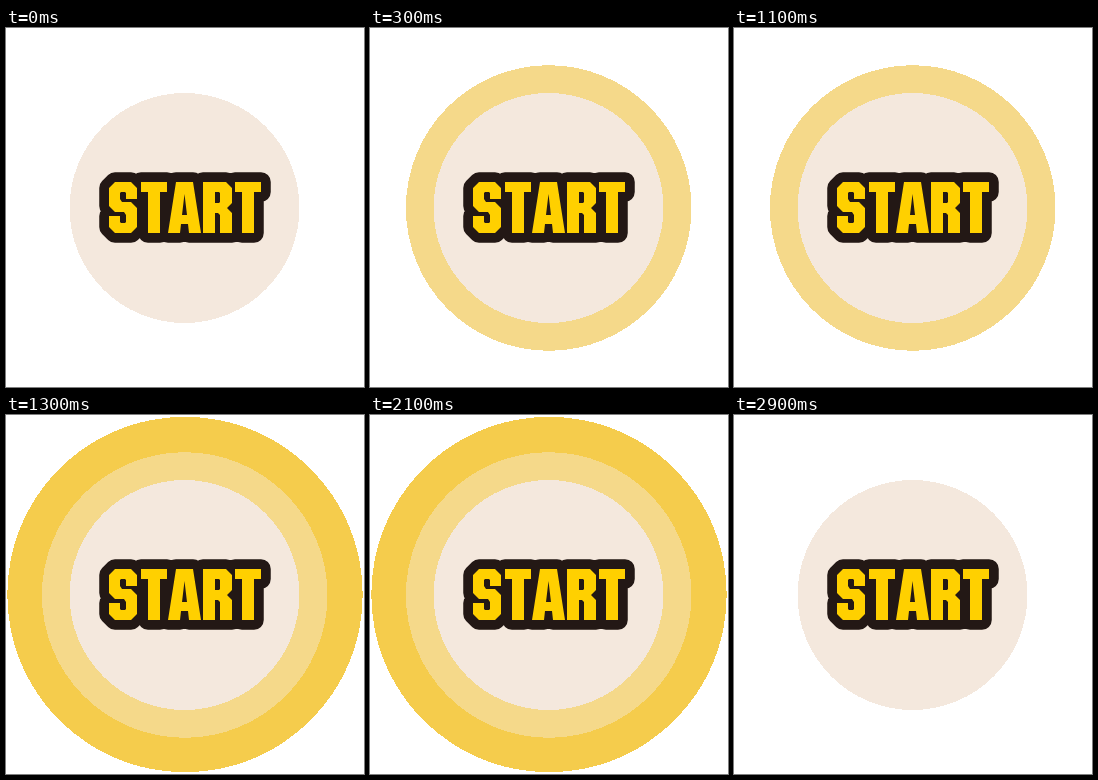
Animation of 358 by 359 pixels, one loop 3 s. Source, as an HTML page:

```html
<!DOCTYPE html>
<html lang="en">
<head>
<meta charset="utf-8">
<title>Start</title>
<style>
  html, body { margin: 0; width: 100%; height: 100%; overflow: hidden; background: #fff; }
  svg { display: block; width: 100%; height: 100%; }
  circle { shape-rendering: crispEdges; }
  .word {
    fill: #ffd000; fill-rule: evenodd;
    stroke: #231815; stroke-width: 19.5; stroke-linejoin: round; paint-order: stroke;
  }
</style>
</head>
<body>
<svg viewBox="0 0 358 359" role="img" aria-label="START">
  <circle id="outer" cx="179" cy="179.5" r="177.7" fill="#f5cc4c"/>
  <circle id="middle" cx="178.7" cy="180" r="142.8" fill="#f5d98a"/>
  <circle id="rim" cx="178.5" cy="180" r="115.5" fill="#f5d98a"/>
  <circle cx="178.5" cy="180" r="115" fill="#f4e8dd"/>
  <path class="word" d="
    M109 154H125L131 160V171H120V165L119 164H115L114 165V171L116 174H125L131 180V199L125 205H109L103 199V188H114V194L115 195H119L120 194V187L118 184H109L103 178V160Z
    M135 154H161V164H154V205H142V164H135Z
    M170 154H187L195 205H183L182 196H175L174 205H162ZM178.5 166L176 187H181Z
    M197 154H220L226 160V175L221 180L226 185V205H214V187L212 185H209V205H197ZM209 164H213L214 165V174L213 175H209Z
    M229 154H255V164H248V205H236V164H229Z"/>
</svg>
<script>
  const LOOP = 3000;
  const show = (id, on) => {
    document.getElementById(id).style.visibility = on ? "visible" : "hidden";
  };

  function draw(now) {
    const t = now % LOOP;
    show("middle", t >= 300 && t < 2300);
    show("outer", t >= 1300 && t < 2300);
    show("rim", t >= 2300 && t < 2500); // thin trace left as the rings vanish
    requestAnimationFrame(draw);
  }
  draw(performance.now());
</script>
</body>
</html>
```
